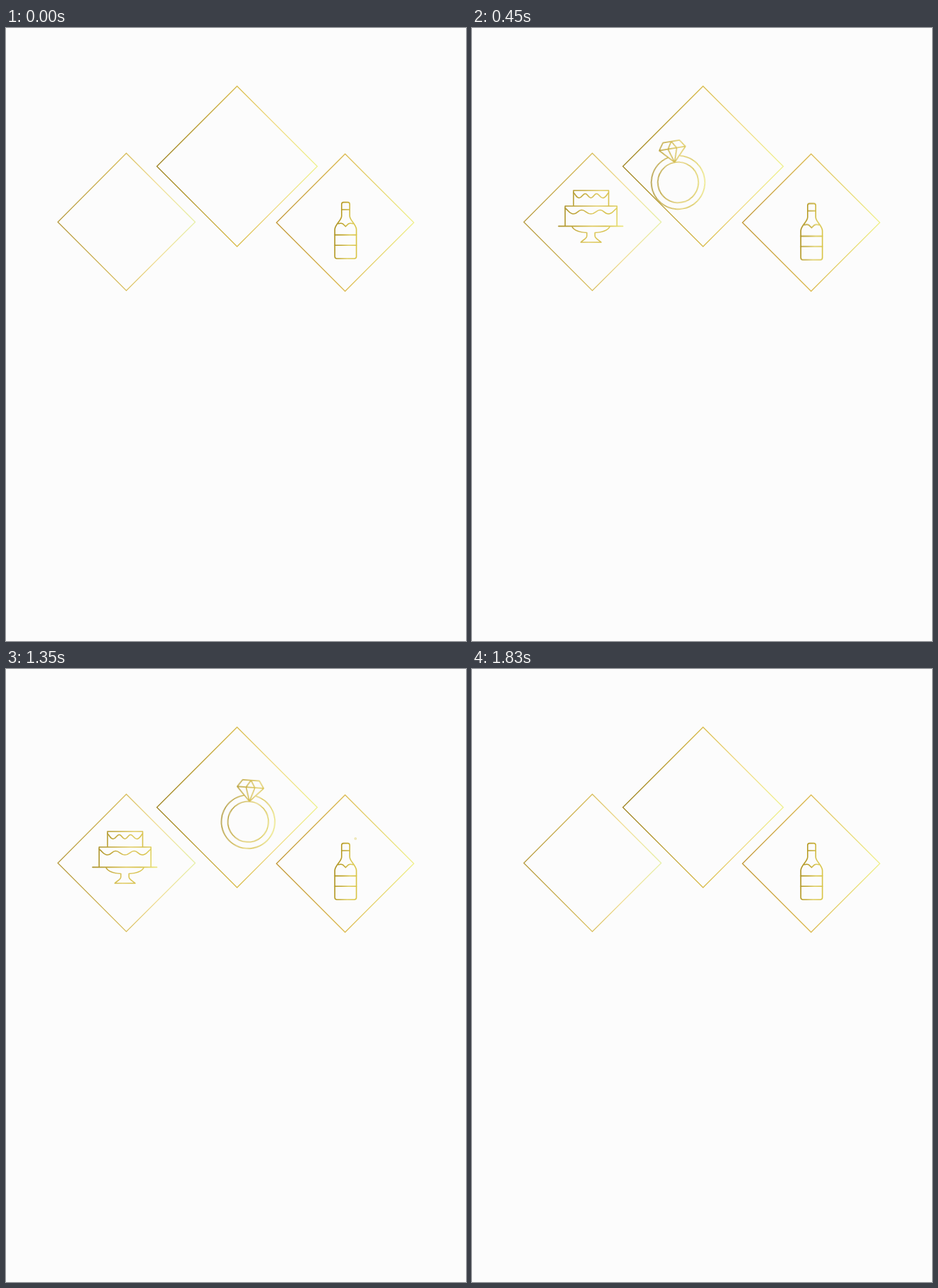
These frames come from a looping animation (648x864 px, 1.86 s). An HTML page:

```html
<!DOCTYPE html>
<html lang="en">
<head>
<meta charset="utf-8">
<title>Wedding icons</title>
<style>
  html, body { margin: 0; width: 100%; height: 100%; overflow: hidden; background: #fcfcfc; }
  svg { display: block; width: 648px; height: 864px; fill: none; stroke-linejoin: round; stroke-linecap: round; }
  .frame { stroke-width: 1.25; stroke-linejoin: miter; }
  .icon { stroke-width: 1.6; }

  .cake, .ring, .bottle, .shine, .rays, .bits, .late {
    animation: 1860ms linear infinite;
  }
  .cake { animation-name: cake; }
  .ring { animation-name: ring; transform-origin: 325.5px 430px; }
  .bottle { animation-name: bottle; }
  .shine { animation-name: shine; }
  .rays { animation-name: rays; transform-origin: 478.3px 245px; }
  .bits { animation-name: bits; }
  .late { animation-name: late; }

  @keyframes cake {
    0%, 3.226% { transform: translateY(145px); animation-timing-function: cubic-bezier(.333, .667, .667, 1); }
    18.01%, 82.26% { transform: none; }
    98.3%, 100% { transform: translateY(145px); }
  }
  /* swings over a pivot far below the ring */
  @keyframes ring {
    0%, 16.13% { transform: rotate(-40.8deg); animation-timing-function: cubic-bezier(.333, 1, .667, 1); }
    37.1% { transform: rotate(0deg); }
    61.51% { transform: rotate(0deg); animation-timing-function: cubic-bezier(.333, 0, .667, 0); }
    85.48%, 100% { transform: rotate(41.6deg); }
  }
  @keyframes bottle {
    0%, 3.226% { transform: translateY(0); animation-timing-function: ease-out; }
    11.29% { transform: translateY(-3.3px); animation-timing-function: ease-in-out; }
    24.19% { transform: translateY(1.7px); animation-timing-function: ease-in-out; }
    30.65%, 100% { transform: translateY(0); }
  }
  @keyframes shine {
    0%, 54.84% { opacity: 0; }
    58.06%, 67.74% { opacity: 1; }
    70.97%, 100% { opacity: 0; }
  }
  @keyframes rays {
    0%, 32.26% { opacity: 0; transform: scale(.4); }
    40.32%, 58.06% { opacity: 1; transform: scale(1); }
    64.52%, 100% { opacity: 0; transform: scale(1); }
  }
  @keyframes bits {
    0%, 38.71% { opacity: 0; }
    43.55%, 61.29% { opacity: 1; }
    67.74%, 100% { opacity: 0; }
  }
  @keyframes late {
    0%, 62.9% { opacity: 0; }
    67.74% { opacity: 1; }
    77.42%, 100% { opacity: 0; }
  }
</style>
</head>
<body>
<svg viewBox="0 0 648 864">
  <defs>
    <linearGradient id="gold">
      <stop offset="0" stop-color="#a8902a"/>
      <stop offset=".3" stop-color="#c4aa3c"/>
      <stop offset=".55" stop-color="#e0cb62"/>
      <stop offset=".75" stop-color="#d6c04a"/>
      <stop offset="1" stop-color="#ebe57c"/>
    </linearGradient>
    <linearGradient id="edge">
      <stop offset="0" stop-color="#9c8220"/>
      <stop offset=".5" stop-color="#d9bc4c"/>
      <stop offset=".72" stop-color="#efd982"/>
      <stop offset="1" stop-color="#eef18c"/>
    </linearGradient>
    <linearGradient id="edgeLeft">
      <stop offset="0" stop-color="#b4983a"/>
      <stop offset=".5" stop-color="#d8bd5a"/>
      <stop offset=".72" stop-color="#f0dc90"/>
      <stop offset="1" stop-color="#e6efa4"/>
    </linearGradient>
    <linearGradient id="edgeRight">
      <stop offset="0" stop-color="#bf9430"/>
      <stop offset=".5" stop-color="#dcba50"/>
      <stop offset="1" stop-color="#eff088"/>
    </linearGradient>
    <linearGradient id="cakeGold" href="#gold" gradientUnits="userSpaceOnUse" x1="124" y1="255" x2="212" y2="275"/>
    <linearGradient id="ringGold" href="#gold" gradientUnits="userSpaceOnUse" x1="288" y1="200" x2="364" y2="212"/>
    <linearGradient id="bottleGold" gradientUnits="userSpaceOnUse" x1="462" y1="284" x2="495" y2="288">
      <stop offset="0" stop-color="#aa901e"/>
      <stop offset=".4" stop-color="#c2a830"/>
      <stop offset=".7" stop-color="#dccb58"/>
      <stop offset="1" stop-color="#d9c444"/>
    </linearGradient>
    <clipPath id="clipLeft"><path d="M169.5 176.5 266.5 273.5 169.5 370.2 73 273.5Z"/></clipPath>
    <clipPath id="clipMid"><path d="M325.5 82 438.5 195 325.5 308 212.5 195Z"/></clipPath>
  </defs>

  <g class="frame">
    <path stroke="url(#edgeLeft)" d="M169.5 176.5 266.5 273.5 169.5 370.2 73 273.5Z"/>
    <path stroke="url(#edge)" d="M325.5 82 438.5 195 325.5 308 212.5 195Z"/>
    <path stroke="url(#edgeRight)" d="M477.7 177.5 574.5 274.2 477.7 371 381 274.2Z"/>
  </g>

  <g class="icon" clip-path="url(#clipLeft)">
    <g class="cake" stroke="url(#cakeGold)">
      <path d="M143 250.5V229H192.5V250.5"/>
      <path d="M143 232C147 236 147 239.5 151 239.5S156 233.5 159.5 233.5 164 239.5 167.5 239.5 172 233.5 175.5 233.5 180 239.5 184 239.5 189 236 192.5 232"/>
      <path d="M131.2 279V251H204.2V279"/>
      <path d="M131.2 254C136 257 137 262 143 262S149 256.5 154.5 256.5 161 262 167.5 262 175 256.5 180.5 256.5 186 262 192 262 199 257 204.2 254"/>
      <path d="M122 279.4H212.5"/>
      <path d="M141 280C144 286 152 288 161.8 288.5V293C161.8 297 157 298 153.3 302H182C178 298 173.2 297 173.2 293V288.5C183 288 191 286 194 280"/>
    </g>
  </g>

  <g class="icon" clip-path="url(#clipMid)" stroke-width="1.4">
    <g class="ring" stroke="url(#ringGold)" style="stroke-width:1.4">
      <path d="M334.5 178.1A37.7 37.7 0 1 1 316.5 178.1"/>
      <circle cx="325.5" cy="214.7" r="28.6"/>
      <path d="M313.5 156.2H337L344 166.3 325.3 186 306.5 166.3ZM306.5 166.3H344M325.3 156.2 319 166.3 325.3 186 331.5 166.3Z"/>
      <path class="shine" d="M325.4 137V146M311.5 141 315 148.5M339.3 141 335.8 148.5"/>
    </g>
  </g>

  <g class="icon" stroke="url(#bottleGold)">
    <g class="bottle">
      <path d="M472.8 248.5Q472.8 245.6 475.5 245.6H481.5Q484.2 245.6 484.2 248.5V265C484.2 271 493.6 277 493.6 284V322Q493.6 325 490.6 325H466.2Q463.2 325 463.2 322V284C463.2 277 472.8 271 472.8 265Z"/>
      <path d="M472.8 256H484.2M463.2 291.6H493.6M463.2 306.3H493.6"/>
      <path d="M468 275.8C471 275 473 275 474.8 276.2L478.4 279.8 482 276.2C484 275 486 275 489 275.8"/>
    </g>
    <g style="stroke-width:1.3">
      <path class="rays" d="M465 227.5Q470 229 472.3 234.5M478.3 223V228.3M491.6 227.5Q486.6 229 484.3 234.5"/>
      <g class="bits">
        <circle cx="463.3" cy="247.8" r="1.4"/>
        <path d="M492.5 252 496.5 256M496.5 252 492.5 256"/>
        <path d="M458.3 261.3 460.8 263.3 458.3 265.3" opacity=".5"/>
      </g>
      <circle class="late" cx="492.3" cy="239" r="1.2"/>
    </g>
  </g>
</svg>
</body>
</html>
```
